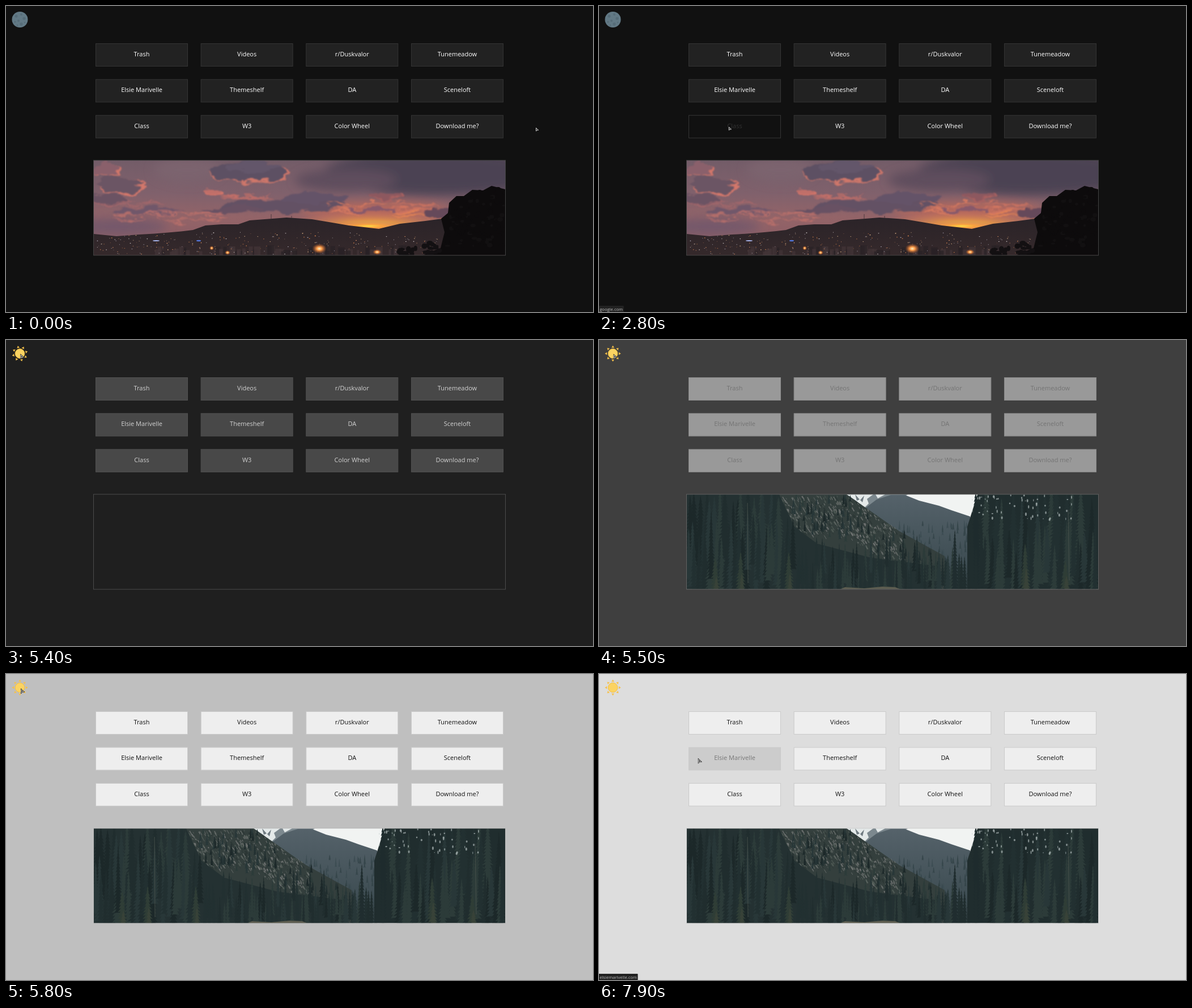
Animation, 1036 px wide and 541 px high, one loop 8 s. Source, as an HTML page:

```html
<!DOCTYPE html>
<html lang="en">
<head>
<meta charset="utf-8">
<title>Start page</title>
<style>
html, body { margin: 0; width: 100%; height: 100%; overflow: hidden; background: #111; }
svg { display: block; width: 1036px; height: 541px; }
text { font-family: "Open Sans", "Noto Sans", sans-serif; }
.label { font-size: 11px; text-anchor: middle; }
</style>
</head>
<body>
<svg id="stage" viewBox="0 0 1036 541" xmlns="http://www.w3.org/2000/svg">
  <defs>
    <clipPath id="frameClip"><rect x="155" y="273" width="726" height="167.5"/></clipPath>
    <filter id="wisp" x="-10%" y="-20%" width="120%" height="140%" color-interpolation-filters="sRGB">
      <feTurbulence type="fractalNoise" baseFrequency=".025 .06" numOctaves="4" seed="5" result="noise"/>
      <feDisplacementMap in="SourceGraphic" in2="noise" scale="26" xChannelSelector="R" yChannelSelector="G"/>
      <feGaussianBlur stdDeviation="1.1"/>
    </filter>
    <filter id="haze" x="-30%" y="-60%" width="160%" height="220%"><feGaussianBlur stdDeviation="9"/></filter>
    <linearGradient id="dusk" x2="0" y2="1">
      <stop offset="0" stop-color="#735c68"/><stop offset=".35" stop-color="#80616c"/>
      <stop offset=".6" stop-color="#936468"/><stop offset=".75" stop-color="#8f6066"/>
    </linearGradient>
    <radialGradient id="glow">
      <stop offset="0" stop-color="#ffdb45"/><stop offset=".35" stop-color="#f9a23f"/>
      <stop offset="1" stop-color="#e0785a" stop-opacity="0"/>
    </radialGradient>
    <radialGradient id="lamp">
      <stop offset="0" stop-color="#fff3c4"/><stop offset=".35" stop-color="#ff9d4a"/>
      <stop offset="1" stop-color="#a04a20" stop-opacity="0"/>
    </radialGradient>
    <linearGradient id="hill" x2="0" y2="1">
      <stop offset="0" stop-color="#2a2328"/><stop offset="1" stop-color="#35292b"/>
    </linearGradient>
    <linearGradient id="peak" x2="0" y2="1">
      <stop offset="0" stop-color="#55626a"/><stop offset=".7" stop-color="#3f4e54"/>
      <stop offset="1" stop-color="#2c3a3c"/>
    </linearGradient>
  </defs>
  <rect id="page" width="1036" height="541"/>
  <g id="moon"></g>
  <g id="sun"></g>
  <g id="buttons"></g>
  <g clip-path="url(#frameClip)"><g id="sunset"></g><g id="forest"></g></g>
  <rect id="frame" x="154.5" y="272.8" width="727" height="168" fill="none"/>
  <g id="status">
    <path id="statusBox" fill="#222"/>
    <text id="statusText" x="1.2" y="538.8" fill="#bbb"></text>
  </g>
  <g id="cursor">
    <path d="M0 0V5.6L1.6 4.3L4.2 3.9Z" fill="#111" stroke="#111" stroke-width="1.9"/>
    <path d="M0 0V5.6L1.6 4.3L4.2 3.9Z" fill="#333" stroke="#eee" stroke-width=".8"/>
  </g>
</svg>
<script>
const $ = id => document.getElementById(id);
const set = (el, attrs) => { for (const k in attrs) el.setAttribute(k, attrs[k]); };
const lerp = (a, b, k) => a + (b - a) * k;
const clamp = v => Math.max(0, Math.min(1, v));
const smooth = (t, start, length) => { const k = clamp((t - start) / length); return k * k * (3 - 2 * k); };
const gray = v => { const c = Math.round(v); return `rgb(${c},${c},${c})`; };

function seeded(seed) {
  const next = () => (seed = (seed * 16807) % 2147483647) / 2147483647;
  return (a, b) => lerp(a, b, next());
}
const repeat = (n, fn) => Array.from({ length: n }, (_, i) => fn(i)).join('');
const ellipse = (x, y, rx, ry, fill, more = '') =>
  `<ellipse cx="${x.toFixed(1)}" cy="${y.toFixed(1)}" rx="${rx.toFixed(1)}" ry="${ry.toFixed(1)}" fill="${fill}" ${more}/>`;
const shape = (d, fill, more = '') => `<path d="${d}" fill="${fill}" ${more}/>`;

// Evening view: sky, clouds, hills, town lights and a tree
function drawSunset() {
  const rnd = seeded(41);
  const warm = ['#ffcf9a', '#f0a070', '#d8d0d0', '#ff9a55', '#b8b4c4'];
  const rimmed = (x, y, rx, ry, fill, rim) => ellipse(x + 2, y + 1.5, rx + 2, ry + 1, rim) + ellipse(x, y, rx, ry, fill);
  const streaks = (n, x, y, w, h, fill) => repeat(n, () =>
    ellipse(x + rnd(-w, w), y + rnd(-h, h), rnd(14, 36), rnd(.6, 1.6), fill, 'opacity=".75"'));
  $('sunset').innerHTML =
    '<rect x="155" y="273" width="726" height="168" fill="url(#dusk)"/>' +
    `<g filter="url(#haze)">${ellipse(760, 295, 200, 40, '#4b4253')}${ellipse(600, 308, 90, 20, '#5e4e5d')}` +
    `${ellipse(195, 390, 90, 16, '#75596a')}${ellipse(320, 290, 60, 22, '#7b636e')}` +
    `${ellipse(650, 362, 130, 14, '#b8695c')}</g>` +
    ellipse(645, 387, 150, 24, 'url(#glow)', 'opacity=".7"') +
    '<g filter="url(#wisp)">' +
    rimmed(178, 291, 24, 11, '#8a606b', '#d0766a') + rimmed(200, 317, 38, 12, '#6b5564', '#d2776b') +
    rimmed(178, 340, 36, 9, '#6b5363', '#9c656a') +
    rimmed(428, 293, 69, 18, '#5d5063', '#cf776a') + ellipse(438, 284, 52, 8, '#63566a') +
    rimmed(362, 328, 13, 5, '#c06f69', '#d77669') + streaks(9, 420, 336, 30, 4, '#c56f68') +
    ellipse(490, 351, 112, 13, '#635164') + ellipse(540, 339, 60, 10, '#645368') + ellipse(400, 359, 52, 6, '#685163') +
    ellipse(250, 364, 65, 6, '#70576a') + streaks(14, 280, 372, 90, 8, '#c3736b') +
    streaks(8, 220, 352, 55, 8, '#a8696b') + rimmed(672, 335, 32, 6, '#8d585f', '#a86160') +
    streaks(14, 660, 358, 90, 9, '#dd7c60') + streaks(10, 715, 352, 60, 10, '#d07460') +
    streaks(10, 735, 370, 55, 7, '#e88653') + ellipse(650, 361, 42, 3, '#87596a') +
    ellipse(768, 366, 25, 9, '#65495a') + '</g>' +
    ellipse(640, 389, 66, 8, 'url(#glow)') +
    shape('M155 403L195 407L235 404Q290 401 330 396L352 388L380 386L410 386L430 379L470 376L495 374L540 377L570 382L605 388L658 394L695 385L740 380L785 374L881 370V441H155Z', 'url(#hill)') +
    shape('M468 368V376M504 371V376', 'none', 'stroke="#332a30" stroke-width=".7"') +
    repeat(65, () => {
      const x = rnd(260, 700);
      return `<rect x="${x}" y="${rnd(423, 435)}" width="${rnd(4, 12)}" height="18" fill="${rnd(0, 1) < .5 ? '#443638' : '#282126'}" opacity=".7"/>`;
    }) +
    repeat(240, i => {
      const x = rnd(160, 765), y = rnd(407 - 8 * Math.sin((x - 155) / 610 * Math.PI), 439);
      return ellipse(x, y, rnd(.4, 1.1), rnd(.4, .9), warm[i % warm.length], `opacity="${rnd(.3, .95).toFixed(2)}"`);
    }) +
    ellipse(265, 415, 6, 1, '#a9b6ee') + ellipse(340, 415, 4, 1.2, '#5578df') +
    ellipse(553, 429, 13, 9, 'url(#lamp)') + ellipse(655, 435, 8, 5, 'url(#lamp)') +
    ellipse(391, 436, 5, 4, 'url(#lamp)') + ellipse(363, 428, 4, 4, 'url(#lamp)') +
    shape('M768 376L780 366L782 348L795 336L808 336L823 325L842 326L857 318L881 324V441H735L767 428L774 400Z', '#0d0b0c') +
    repeat(150, () => {
      const x = rnd(779, 881), top = 372 - 50 * Math.sin(clamp((x - 772) / 95) * Math.PI / 2);
      return ellipse(x, rnd(top, 425), rnd(2, 5), rnd(1.5, 4), rnd(0, 1) < .7 ? '#0d0b0c' : '#121011');
    }) +
    [[708, 432, 15, 9], [750, 425, 15, 13]].map(([x, y, w, h]) =>
      repeat(22, () => ellipse(x + rnd(-w, w), y + rnd(-h, h) * .8 + 3, rnd(3, 6), rnd(2, 5), '#131012'))).join('');
}

// Valley view: snowy peak, far ridge, rocky slope and firs
function fir(rnd, x, top, height, width, fill) {
  const tiers = Math.max(6, Math.round(height / 6));
  let left = '', right = '';
  for (let i = 1; i <= tiers; i++) {
    const y = top + height * i / tiers, w = width * (i / tiers) ** .75 * rnd(.7, 1.1);
    right += `L${(x + w).toFixed(1)} ${y.toFixed(1)}L${(x + w * .4).toFixed(1)} ${(y - 1).toFixed(1)}`;
    left = `L${(x - w * .4).toFixed(1)} ${(y - 1).toFixed(1)}L${(x - w * rnd(.85, 1.1)).toFixed(1)} ${y.toFixed(1)}` + left;
  }
  return shape(`M${x.toFixed(1)} ${top.toFixed(1)}${right}${left}Z`, fill);
}

function drawForest() {
  const rnd = seeded(97);
  const dark = ['#1c2829', '#223031', '#283738', '#202d2e', '#2c3b39'];
  const ridge = x => x < 437 ? 273 : 273 + (x - 437) * .66;
  const pick = () => dark[Math.floor(rnd(0, dark.length))];
  const row = (n, x0, x1, y0, y1, h, w) => repeat(n, i => {
    const x = lerp(x0, x1, (i + rnd(0, 1)) / n);
    return fir(rnd, x, rnd(y0, y1), h * rnd(.8, 1.2), w * rnd(.8, 1.2), pick());
  });
  const lit = (x, y, h) => fir(rnd, x, y, h, 11, '#2f3d36') + fir(rnd, x + 2, y + h * .55, h * .5, 8, '#384238');
  $('forest').innerHTML =
    '<rect x="155" y="273" width="726" height="168" fill="#f1f3f2"/>' +
    shape('M430 273H545L480 312Z', '#7c888e') +
    shape('M437 273H484L473 281L476 289L468 297L455 285ZM488 273H505L492 280Z', '#e4e9e9') +
    shape('M452 273L460 282L455 284ZM468 275L465 287L461 283Z', '#6f7a80') +
    shape('M466 300L490 282L515 274H540L565 284L600 293L622 301L655 312V441H480Z', 'url(#peak)') +
    repeat(70, () => fir(rnd, rnd(500, 650), rnd(318, 375), rnd(10, 18), 2.5, rnd(0, 1) < .5 ? '#3d4d53' : '#36464b')) +
    shape('M155 273H437L470 296L530 338L570 360L610 382V441H155Z', '#343f3d') +
    repeat(620, i => {
      const x = rnd(315, 535), y = ridge(x) + rnd(2, 73), l = rnd(2, 7);
      return shape(`M${x.toFixed(1)} ${y.toFixed(1)}l${(l * .6).toFixed(1)} ${l.toFixed(1)}`, 'none',
        `stroke="${['#7b7d7d', '#56605b', '#6a6f6d', '#2a3533'][i % 4]}" stroke-width="${rnd(.7, 2.4).toFixed(1)}" opacity=".75"`);
    }) +
    repeat(95, () => {
      const x = rnd(335, 600);
      return fir(rnd, x, ridge(x) + rnd(-5, 65), rnd(11, 23), 3.4, pick());
    }) +
    shape('M155 273H318L345 330L385 360L480 385L600 400V441H155Z', '#243132') +
    shape('M650 441V330L668 273H881V441Z', '#202d2e') +
    row(18, 155, 325, 255, 285, 120, 14) + row(26, 345, 600, 345, 375, 65, 6) +
    row(32, 155, 345, 300, 350, 110, 10) + row(42, 350, 620, 375, 405, 60, 5) +
    shape('M425 441L434 437L468 439L500 436L523 437L533 441Z', '#5d5d50') +
    row(7, 600, 650, 365, 385, 75, 8) + fir(rnd, 628, 336, 105, 9, '#202d2f') +
    row(20, 662, 881, 245, 280, 150, 15) +
    repeat(60, () => ellipse(rnd(658, 835), rnd(274, 318), rnd(.5, 1.8), rnd(.8, 3), '#c4cdce', 'opacity=".6"')) +
    fir(rnd, 665, 268, 170, 17, '#1e2b2d') + row(34, 655, 881, 315, 375, 105, 10) +
    shape('M262 288L263 430M828 300L830 425', 'none', 'stroke="#4d5650" stroke-width=".8"') +
    lit(205, 385, 60) + lit(250, 375, 70) + lit(335, 375, 70) + lit(752, 360, 80) + lit(823, 390, 50);
}

const labels = ['Trash', 'Videos', 'r/Duskvalor', 'Tunemeadow', 'Elsie Marivelle', 'Themeshelf',
  'DA', 'Sceneloft', 'Class', 'W3', 'Color Wheel', 'Download me?'];
const addresses = { 0: 'https://twitter.com', 4: 'elsiemarivelle.com' };
const buttons = labels.map((label, i) => {
  const x = 158 + (i % 4) * 185.65, y = 66 + Math.floor(i / 4) * 63.4;
  $('buttons').insertAdjacentHTML('beforeend',
    `<g><rect x="${x + .5}" y="${y + .5}" width="162" height="40"/><text class="label" x="${x + 81.5}" y="${y + 23}">${label}</text></g>`);
  const [box, text] = $('buttons').lastChild.children;
  return { x, y, box, text };
});

$('moon').innerHTML = ellipse(24.5, 24, 14, 14, '#627985') +
  [[18, 18, 2.5], [27, 15, 2], [32, 22, 2.6], [22, 26, 2], [16, 28, 1.6], [27, 32, 2.7], [20, 34, 1.4], [33, 29, 1.2]]
    .map(([x, y, r]) => ellipse(x, y, r, r, '#566c78')).join('');
$('sun').innerHTML = repeat(8, i =>
  shape('M22 13.8L24.5 9.8L27 13.8Q24.5 13.2 22 13.8Z', '#f5c04a', `transform="rotate(${i * 45} 24.5 24)"`)) +
  ellipse(24.5, 24, 8.4, 8.4, '#fbd362', 'stroke="#f4bc3c" stroke-width=".8"');

// Pointer path: [step, x, y], one step is 100 ms
const path = [[0, 935.5, 215.5], [12, 935.5, 215.5], [13, 929, 216.5], [14, 921.5, 218], [16, 921.5, 218],
  [17, 905, 215], [20, 790, 202], [23, 575, 202], [25, 400, 207], [26, 310, 211], [28, 229.3, 214],
  [30, 215, 205], [32, 205, 172], [34, 200, 155], [37, 215, 146], [40, 225, 106], [42, 215, 92],
  [44, 175, 82], [45, 130, 68], [47, 46.5, 50], [49, 33, 36], [51, 26, 27], [54, 26.3, 26.5],
  [58, 27, 27.5], [61, 27.3, 27.5], [65, 80, 52], [68, 150, 89], [70, 172, 104], [72, 180, 120],
  [75, 178, 141], [79, 175.7, 151], [80, 175.7, 151]];
function pointer(n) {
  const i = path.findIndex(p => p[0] > n), a = path[i - 1], b = path[i];
  const k = (n - a[0]) / (b[0] - a[0]);
  return [lerp(a[1], b[1], k), lerp(a[2], b[2], k)];
}
function hovered(n) {
  if (n < 0) return -1;
  const [px, py] = pointer(n);
  return buttons.findIndex(b => px >= b.x && px <= b.x + 163 && py >= b.y && py <= b.y + 41);
}
function hoverAmounts(n) {
  const amounts = buttons.map(() => 0);
  for (let s = 0; s <= n; s++) {
    const over = hovered(s);
    amounts.forEach((v, i) => { amounts[i] = clamp(v + (i === over ? .34 : -.3)); });
  }
  return amounts;
}

function drawStatus(n) {
  let age = 0, i = -1;
  while (age < 4 && (i = hovered(n - 2 - age)) < 0) age++;
  $('status').style.display = i < 0 ? 'none' : '';
  if (i < 0) return;
  const text = addresses[i] || 'google.com', full = text.startsWith('https');
  const el = $('statusText');
  el.textContent = text;
  el.style.fontSize = full ? '6.7px' : '7.6px';
  el.style.fontFamily = full ? '"Liberation Sans", sans-serif' : '';
  const w = el.getComputedTextLength() + 2.8;
  set($('statusBox'), { d: `M0 530H${w - 1}Q${w} 530 ${w} 531V541H0Z` });
  $('status').setAttribute('opacity', 1 - age / 4);
}

function render(n) {
  const t = n * 100, day = t >= 5300;
  const pageMix = smooth(t, 5293, 670), boxMix = smooth(t, 5300, 360);
  set($('page'), { fill: gray(lerp(17, 221, pageMix)) });
  set($('frame'), { stroke: gray(lerp(66, 204, pageMix)) });
  $('moon').style.display = day ? 'none' : '';
  $('sun').style.display = day ? '' : 'none';
  $('sunset').style.display = day ? 'none' : '';
  $('forest').style.display = t >= 5500 ? '' : 'none';
  set($('moon'), { transform: `rotate(${Math.max(0, n - 48) * 5} 24.5 24)` });
  set($('sun'), { transform: `rotate(${(n - 58) * 15} 24.5 24)` });
  hoverAmounts(n).forEach((h, i) => {
    const { box, text } = buttons[i];
    set(box, {
      fill: gray(lerp(lerp(34, 238, boxMix), lerp(17, 204, boxMix), h)),
      stroke: gray(lerp(53, 202, boxMix))
    });
    set(text, { fill: gray(lerp(lerp(255, 17, boxMix), lerp(51, 119, boxMix), h)) });
  });
  set($('cursor'), { transform: `translate(${pointer(n).join(' ')})` });
  drawStatus(n);
}

drawSunset();
drawForest();
let shown = -1;
function tick() {
  const n = Math.floor(performance.now() % 8000 / 100);
  if (n !== shown) render(shown = n);
  requestAnimationFrame(tick);
}
tick();
</script>
</body>
</html>
```
